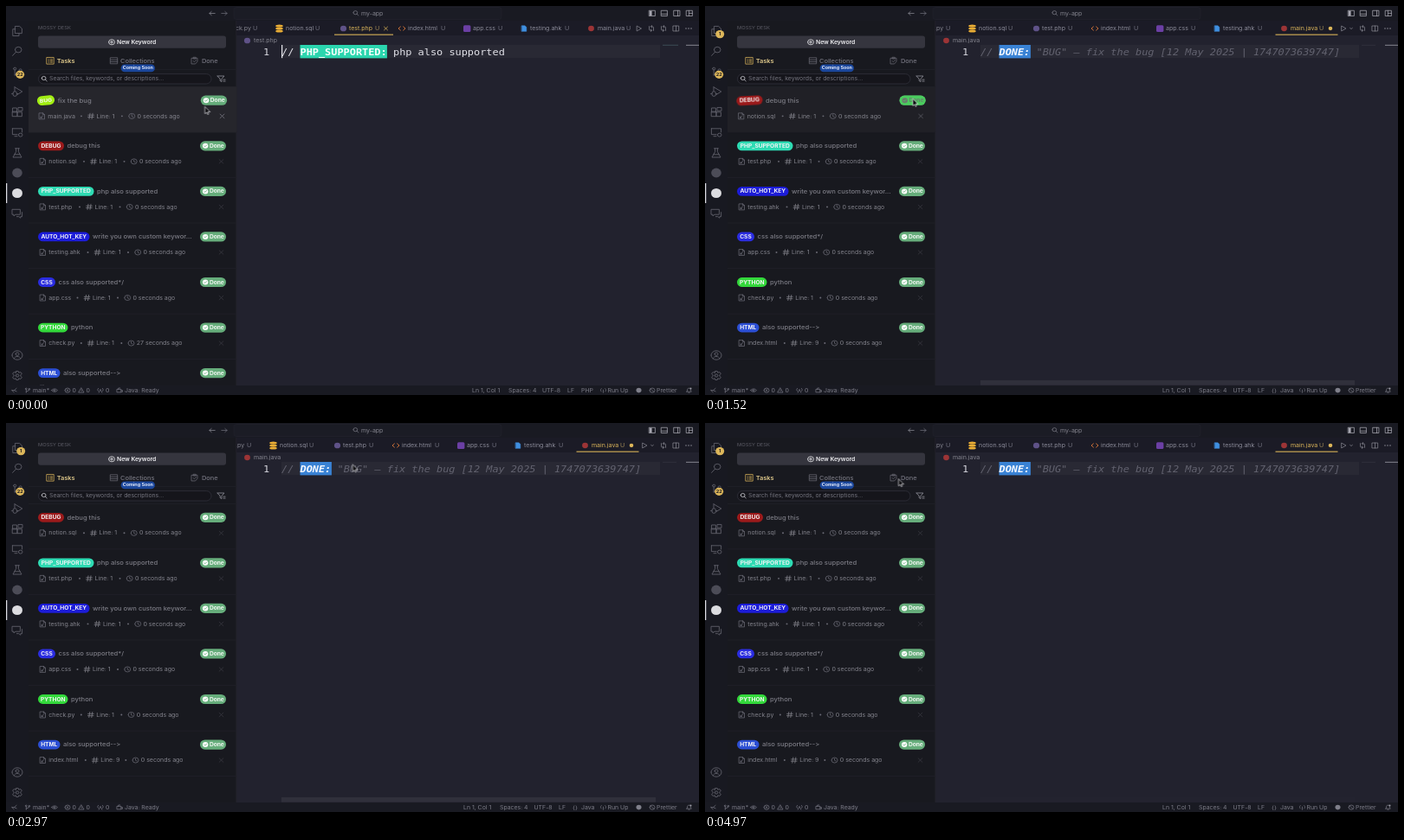
An HTML page that plays this animation: 800x450 px, repeating every 5000 ms.

```html
<!DOCTYPE html>
<html lang="en">
<head>
<meta charset="utf-8">
<title>Task list</title>
<style>
html, body { margin: 0; width: 100%; height: 100%; overflow: hidden; background: #22222e; }
svg { display: block; width: 100%; height: 100%; font-family: Inter, Roboto, sans-serif; }
text { white-space: pre; font-feature-settings: "calt" 0, "liga" 0; }
.code { font: 11.9px "DejaVu Sans Mono", "Liberation Mono", monospace; }
.bold { font-weight: 700; }
.slant { font-style: italic; }
.before, .after, .full, .bare, .loaded, .caret { animation: 5s step-end infinite; }
.before { animation-name: before; }
.after { animation-name: after; }
.full { animation-name: full; }
.bare { animation-name: bare; }
.loaded { animation-name: loaded; }
.caret { animation-name: caret; }
@keyframes before { 0% { opacity: 1 } 16%, 100% { opacity: 0 } }
@keyframes after { 0% { opacity: 0 } 16%, 100% { opacity: 1 } }
@keyframes full { 0% { opacity: 1 } 18%, 100% { opacity: 0 } }
@keyframes bare { 0% { opacity: 0 } 18% { opacity: 1 } 26%, 100% { opacity: 0 } }
@keyframes loaded { 0% { opacity: 0 } 26%, 100% { opacity: 1 } }
@keyframes caret { 0% { opacity: 1 } 10%, 100% { opacity: 0 } }

.row { transform-origin: 145px 120px; }
.tag { transform-box: fill-box; transform-origin: center; }
.full .hover { transform: scale(1.01); }
.full .hover .tag { transform: rotate(-5deg); }
.full .lit { animation: press 5s infinite; }
.loaded .hover { animation: grow 5s infinite; }
.loaded .hover .tag { animation: tilt 5s infinite; }
.loaded .glow, .loaded .lit { animation: glow 5s infinite; }
@keyframes press { 0%, 3% { opacity: 0 } 6%, 100% { opacity: 1 } }
@keyframes grow { 0%, 29%, 43%, 100% { transform: none } 33%, 39% { transform: scale(1.01) } }
@keyframes tilt { 0%, 29%, 43%, 100% { transform: none } 33%, 39% { transform: rotate(-5deg) } }
@keyframes glow { 0%, 29%, 43%, 100% { opacity: 0 } 33%, 39% { opacity: 1 } }

.bar { animation: bar 5s linear infinite; }
@keyframes bar { 0%, 85% { opacity: 1 } 99%, 100% { opacity: .15 } }
.pointer { animation: point 5s ease-in-out infinite; }
@keyframes point {
  0%, .6% { transform: translate(229.6px, 116.8px) }
  8%, 30% { transform: translate(239.8px, 107.6px) }
  34%, 38% { transform: translate(240.6px, 107px) }
  46%, 78.8% { transform: translate(400.2px, 48.3px) }
  89% { transform: translate(225px, 65.5px) }
  90.4%, 100% { transform: translate(223.4px, 65px) }
}
</style>
</head>
<body>
<svg viewBox="0 0 800 450" preserveAspectRatio="none"></svg>
<script>
const GOLD = '#dcb65a', GRAY = '#6a6a75', DIM = '#85858f';
// the screen is a taller one, flattened evenly
const FLAT = .87;

const rect = (x, y, w, h, fill, r = 0, more = '') =>
  `<rect x="${x}" y="${y}" width="${w}" height="${h}" rx="${r}" fill="${fill}" ${more}/>`;
const dot = (x, y, r, fill) => `<ellipse cx="${x}" cy="${y}" rx="${r}" ry="${r * .93}" fill="${fill}"/>`;
const place = (x, y) => `transform="translate(${x} ${y}) scale(1 ${FLAT})"`;
const icon = (x, y, d, color = GRAY, width = .8, fill = 'none') =>
  `<path ${place(x, y)} d="${d}" fill="${fill}" stroke="${color}" stroke-width="${width}" stroke-linecap="round" stroke-linejoin="round"/>`;
// y is the middle of the line
const label = (x, y, str, fill = DIM, size = 7, weight = 400, anchor = 'start') =>
  `<text ${place(x, y + size * .36 * FLAT)} fill="${fill}" font-size="${size}" font-weight="${weight}" text-anchor="${anchor}">${str}</text>`;
const code = (x, str, fill, style = '') =>
  `<text class="code ${style}" ${place(x, 56.5)} fill="${fill}">${str}</text>`;
const group = (name, ...parts) => `<g class="${name}">${parts.join('')}</g>`;
const ring = r => `M${-r} 0a${r} ${r} 0 1 0 ${2 * r} 0a${r} ${r} 0 1 0 ${-2 * r} 0`;

const shape = {
  cross: 'M-2.4-2.6L2.4 2.6M2.4-2.6L-2.4 2.6',
  check: 'M-1.4 .1L-.4 1.1L1.5-1.1',
  file: 'M-3-4H1L3-2V4H-3ZM1-4V-2H3M-1.4 2.2L1.2-.5M-1.4 2.2V.8M-1.4 2.2H0',
  hash: 'M-1-3.6L-2 3.6M2-3.6L1 3.6M-3.2-1.3H3.4M-3.4 1.3H3.2',
  clock: ring(3.5) + 'M0-2V.2L1.5 1',
  lens: 'M-2.6-.8a2.4 2.4 0 1 0 4.8 0a2.4 2.4 0 1 0-4.8 0M1.6 1L3.4 3',
  list: 'M-4-4.4H4V4.4H-4ZM-2-1.8H-1.6M0-1.8H2.3M-2 .2H-1.6M0 .2H2.3M-2 2.2H-1.6M0 2.2H2.3',
  code: 'M-1.6-2.4L-4 0L-1.6 2.4M1.6-2.4L4 0L1.6 2.4',
  split: 'M-3.2-3.4H3.2V3.4H-3.2ZM0-3.4V3.4',
  gitArrows: 'M-2.5-2.8V1a1.6 1.6 0 0 0 1.6 1.6H.5M-.7 1.2L.6 2.6L-.7 4M2.5 2.8V-1a1.6 1.6 0 0 0-1.6-1.6H-.5M.7-4L-.6-2.6L.7-1.2'
};

// tag, colour, tag width, title, file, file name end, line, age when first shown
const tasks = [
  ['BUG', '#a2ee13', 20, 'fix the bug', 'main.java', 80.5, 1, 0],
  ['DEBUG', '#9b1a1b', 30, 'debug this', 'notion.sql', 83, 1, 0],
  ['PHP_SUPPORTED', '#2edbb3', 64.5, 'php also supported', 'test.php', 78, 1, 0],
  ['AUTO_HOT_KEY', '#1c1cd8', 59.5, 'write you own custom keyword a...', 'testing.ahk', 87.5, 1, 0],
  ['CSS', '#2a2ce0', 20, 'css also supported*/', 'app.css', 75.5, 1, 0],
  ['PYTHON', '#33d83b', 34.5, 'python', 'check.py', 79.8, 1, 27],
  ['HTML', '#2c4fd4', 25.5, 'also supported--&gt;', 'index.html', 84.8, 9, 0]
];

function doneButton(y, icons, lit) {
  const bg = lit ? '#3be04c' : '#66ad7b', ink = lit ? '#10351a' : '#f2f7f3';
  const left = icons ? 224 : 231;
  return rect(left, y - 5.6, 254 - left, 11.2, bg, 5.6)
    + (icons ? dot(230.2, y, 3.2, lit ? '#102416' : '#fff') + icon(230.2, y, shape.check, bg, .9) : '')
    + label(243.3, y, 'Done', ink, 6.6, 700, 'middle');
}

function row(task, i, icons, hover, fresh) {
  const [tag, color, width, title, file, end, line, age] = task;
  const pitch = icons ? 52.55 : 48.75;
  const y = 109.3 + i * pitch, m = y + (icons ? 18 : 16);
  const e = icons ? end : end - 8.4;
  const at = icons ? [7, 24.5, 53.5, 71] : [8, 17, 46, 56];
  const text = icons ? title.replace('keyword a', 'keywor') : title;
  const meta = '#85858e';
  return group(hover ? 'row hover' : 'row',
    hover ? group('glow', rect(26, 93.6, 239, 52.4, '#26262c')) : '',
    rect(26, 93 + (i + 1) * pitch, 239, .7, '#22222a'),
    group('tag', rect(37, y - 5.4, width, 10.8, color, 5.4),
      label(37 + width / 2, y, tag, '#f4f4f6', 6.6, 700, 'middle')),
    label(40.5 + width, y, text, '#7d7d86', 7.6, 500),
    doneButton(y, icons, false),
    label(icons ? 49.3 : 41, m, file, meta),
    dot(e + at[0], m, 1, GRAY),
    label(e + at[1], m, 'Line: ' + line, meta),
    dot(e + at[2], m, 1, GRAY),
    label(e + at[3], m, (fresh ? 0 : age) + ' seconds ago', meta),
    icons ? icon(42.5, m, shape.file) + icon(e + 18, m, shape.hash, meta)
      + icon(e + 64.7, m, shape.clock) + icon(248.5, m, shape.cross, '#3a3a43') : '',
    hover ? group('glow', icon(248.5, m, shape.cross, '#74747d')) + group('lit', doneButton(y, true, true)) : '');
}
const list = (name, from, icons) =>
  group(name, ...tasks.slice(from).map((t, i) => row(t, i, icons, icons && i === 0, from > 0)));

const database = x => [-3, 0, 3].map(d =>
  `<ellipse cx="${x}" cy="${26 + d}" rx="4.3" ry="1.6" fill="#e9ad35"/>`).join('');
const page = x => icon(x, 26, 'M-2.6-3.6H1L2.8-1.8V3.8H-2.6Z', '#3f8fe0', .6, '#3f8fe0');

function tabs(shift, active) {
  const tab = (x, u, name) => {
    const c = name === active ? GOLD : '#8d8d9b';
    return label(x + shift, 26, name, c) + label(u + shift, 26, 'U', name === active ? '#a08a58' : '#737380');
  };
  return database(315.5 + shift) + tab(323, 357, 'notion.sql')
    + dot(389.5 + shift, 26, 3.6, '#5f5288') + tab(396, 426, 'test.php')
    + icon(457 + shift, 26, shape.code, '#d8773a', 1) + tab(464, 502, 'index.html')
    + rect(528 + shift, 22.3, 8.4, 7.6, '#6b3fa4', 1.5) + tab(539, 568, 'app.css')
    + page(598 + shift) + tab(605, 645, 'testing.ahk')
    + dot(675.5 + shift, 26, 3.4, '#9c3436') + tab(683, 716, 'main.java');
}

const status = (x, str) => label(x, 444.6, str, '#7f7f8a', 6.9);

function chrome() {
  const lay = 'M-3.4-3.6H3.4V3.6H-3.4Z', ink = '#a8a8b2';
  return rect(0, 0, 800, 17, '#191a22') + rect(266, 17, 534, 17, '#1b1b26')
    + rect(263, 1.5, 309, 14, '#1b1c25', 3, 'stroke="#23232d" stroke-width=".7"')
    + icon(403.5, 8.4, shape.lens, DIM, .7) + label(410, 8.6, 'my-app')
    + icon(238, 8.5, 'M3.2 0H-3.2M-.8-2.4L-3.2 0L-.8 2.4', DIM)
    + icon(252, 8.5, 'M-3.2 0H3.2M.8-2.4L3.2 0L.8 2.4', GRAY)
    + icon(746, 8.4, lay, ink) + rect(743, 5.6, 2.6, 5.6, ink)
    + icon(760, 8.4, lay + 'M-3.4 1H3.4', ink)
    + icon(774.5, 8.4, lay + 'M1-3.6V3.6', ink)
    + icon(789, 8.4, lay + 'M-.6-3.6V3.6M-.6 0H3.4', ink)
    + icon(759, 26, shape.gitArrows, DIM) + icon(773.5, 26, shape.split, DIM)
    + [785, 788, 791].map(x => dot(x, 26, .8, DIM)).join('');
}

function editor() {
  const mark = rect(785, 44.8, 15, 1.2, '#74747f') + rect(318, 45, 437, 15.2, '#292934');
  const ln = code(297, '1', '#d5d5dd');
  return group('before', tabs(0, 'test.php'), label(265, 26, 'ck.py'), label(285, 26, 'U', '#737380'),
      rect(379, 32.6, 68, 1.1, GOLD), icon(438.5, 26, 'M-2-2.2L2 2.2M2-2.2L-2 2.2', GOLD),
      icon(730.5, 26, 'M-2-3.2L3 0L-2 3.2Z', DIM), icon(745, 26, shape.gitArrows, DIM),
      dot(278.5, 40, 3.6, '#5f5288'), label(286, 40, 'test.php'),
      mark, ln, rect(758, 44.8, 18, 1, '#3c4c55'), rect(339.5, 45, 100.4, 15.4, '#2bd5ae'),
      code(318, '//', '#e3e3ea'), code(339.5, 'PHP_SUPPORTED:', '#f5fffc', 'bold'), code(447, 'php also supported', '#e3e3ea'))
    + group('caret', rect(318, 45, 1.2, 15.2, '#e8e8ee'))
    + group('after', tabs(-7, 'main.java'), label(265, 26, '.py'), label(278, 26, 'U', '#737380'),
      rect(658.5, 32.6, 72, 1.1, GOLD), dot(722, 26, 2.3, GOLD),
      icon(737, 26, 'M-2-3.2L3 0L-2 3.2Z', DIM), icon(746, 26, 'M-1.4-.7L0 .7L1.4-.7', DIM),
      dot(278.5, 40, 3.4, '#9c3436'), label(286, 40, 'main.java'),
      mark, ln, rect(758, 44.8, 16, 1, '#31313c'), rect(339.5, 45, 36.4, 15.4, '#3982d4'),
      code(318, '//', '#62626f', 'slant'), code(339.5, 'DONE:', '#f6f9ff', 'bold slant'),
      code(382.5, '"BUG" – fix the bug [12 May 2025 | 1747073639747]', '#62626f', 'slant'),
      group('bar', rect(318, 433, 432, 5.6, '#30303b')));
}

function sidebar() {
  const tab = (x, name, c, w) => label(x, 63.2, name, c, 7.4, w);
  return rect(26, 17, 240, 422, '#18191f') + rect(265.4, 17, .8, 422, '#23232c')
    + label(37, 25.5, 'MOSSY DESK', '#5c5c66', 5.8)
    + rect(37, 34.6, 217, 14.2, '#35353e', 3)
    + icon(122, 41.8, ring(3.5) + 'M-1.8 0H1.8M0-1.8V1.8', '#f0f0f3') + label(128, 41.8, 'New Keyword', '#f0f0f3', 6.8, 600)
    + icon(51.2, 63.3, shape.list, GOLD) + tab(58.7, 'Tasks', '#e2cb8c', 600)
    + rect(26, 73, 239, .7, '#22222a')
    + icon(124.7, 63.3, 'M-4-4H4V4H-4ZM-4-1.2H4M-4 1.4H4', GRAY) + tab(132, 'Collections', '#767680', 500)
    + icon(218, 63.3, 'M-3.6-3.4H3V1L.6 4.2H-3.6ZM-1.5-4.6H1.2V-2.6H-1.5ZM-1.8 .4L-.6 1.5L1.5-.8', GRAY) + tab(226, 'Done', '#767680', 500)
    + rect(132.6, 67.4, 39.4, 8.8, '#1b479c', 4.4) + label(152.3, 71.8, 'Coming Soon', '#e8eefc', 5.4, 700, 'middle')
    + rect(37.4, 78.6, 199.6, 11.4, '#15151b', 5.7, 'stroke="#32323b" stroke-width=".8"')
    + icon(43.8, 84.2, shape.lens, '#c4c4ca', .9) + label(50, 84.3, 'Search files, keywords, or descriptions...', '#767680', 6.9)
    + icon(248.5, 84.3, 'M-4.4-3.8H3.4L.4 .2V3.8L-1.4 2.4V.2ZM2.4 1H4.6M2.4 3.2H4.6', '#9a9aa3')
    + rect(26, 93, 239, .7, '#22222a')
    + list('full', 0, true) + list('bare', 1, false) + list('loaded', 1, true);
}

function activity() {
  const badge = (x, y, n) => dot(x, y, 5, GOLD) + label(x, y, n, '#1a1a20', 5.6, 700, 'middle');
  const at = (y, d) => icon(13, y, d, '#60606b', .95);
  return rect(0, 17, 26, 422, '#181921')
    + at(29, 'M-2.2-6.4H2.6L5.4-3.4V3H-2.2ZM-2.2-2.6H-5.2V6.4H2V3')
    + at(52, 'M-2.6-1.6a3.8 3.8 0 1 0 7.6 0a3.8 3.8 0 1 0-7.6 0M-1.5 1.5L-5.4 6.2')
    + at(76, 'M-4.4-4a1.6 1.6 0 1 0 3.2 0a1.6 1.6 0 1 0-3.2 0M2-2a1.6 1.6 0 1 0 3.2 0a1.6 1.6 0 1 0-3.2 0M-2.8-2.2V5M3.6-.2C3.4 2-2.8 1-2.8 4')
    + at(99, 'M-3-6L5.8 0L0 4M-3-6V-.6M-5 2a2.2 2.2 0 1 1 4.4 0V4a2.2 2.2 0 1 1-4.4 0ZM-6.4 3H-5M-.6 3H.8')
    + at(123, 'M-5.4-1H0V5.4H-5.4ZM0-1V5.4H5.4V-.2H-5.4M-5.4-1V-5.8H-.6V-1M1.4-6.4H6V-2H1.4Z')
    + at(146, 'M-5.6-4.8H5.6V0M-5.6-4.8V3H0M-3 5.4H0M1.4 3.6a2.3 2.3 0 1 0 4.6 0a2.3 2.3 0 1 0-4.6 0')
    + at(170, 'M-2.4-6H2.4M-1.4-6V-1.6L-5 5.8H5L1.4-1.6V-6M-3.2 2H3.2')
    + dot(13, 193, 5.8, '#4c4c57')
    + rect(0, 205, 1.3, 23, '#d8d8de') + dot(13, 216.5, 6, '#dcdce0')
    + at(240, 'M-5.6-5.4H3.4V1.4H-2L-4 3.4V1.4H-5.6ZM5.6-1.6V4.2H3.8V6L1.8 4.2H-.6')
    + at(404, ring(6) + 'M-2-1.6a2 2 0 1 0 4 0a2 2 0 1 0-4 0M-3.8 4.4C-3 .6 3 .6 3.8 4.4')
    + at(427.5, ring(1.8) + 'M-1.2-5.8H1.2L1.8-3.8L3.8-4.6L5.4-2.4L3.8-.8V.8L5.4 2.4L3.8 4.6L1.8 3.8L1.2 5.8H-1.2L-1.8 3.8L-3.8 4.6L-5.4 2.4L-3.8 .8V-.8L-5.4-2.4L-3.8-4.6L-1.8-3.8Z')
    + badge(16.2, 79.3, '22') + group('after', badge(17.2, 32.6, '1'));
}

function statusBar() {
  const at = (x, d) => icon(x, 444.6, d, '#7f7f8a', .7);
  return rect(0, 439, 800, 11, '#191a22')
    + at(9.5, 'M-2.6 0L-.4 2.4M-2.6 0H-.2M2.6-2.6L0 0L2.6 1.4')
    + at(25, 'M-2.6-2a.9.9 0 1 0 1.8 0a.9.9 0 1 0-1.8 0M1-1.6a.9.9 0 1 0 1.8 0a.9.9 0 1 0-1.8 0M-1.7-1V3M1.9-.6C1.6 1.4-1.7 .4-1.7 2') + status(31, 'main*')
    + at(56, 'M-3.4 0C-2-2.6 2-2.6 3.4 0C2 2.6-2 2.6-3.4 0M-1 0a1 1 0 1 0 2 0a1 1 0 1 0-2 0')
    + at(71, ring(3) + 'M-1.1-1.1L1.1 1.1M1.1-1.1L-1.1 1.1') + status(76.5, '0')
    + at(87, 'M0-3L3 2.8H-3ZM0-.8V.8') + status(92.5, '0')
    + at(109, 'M-2.4-2.6C-3.6-1-3.6 0-2.4 1M2.4-2.6C3.6-1 3.6 0 2.4 1M0-1L-1.8 3M0-1L1.8 3') + status(115, '0')
    + at(131.3, 'M-3-1.4H1.6V2.6H-3ZM-1.6-1.4V-3H.4M1.6 0H3.2V2H1.6') + status(137, 'Java: Ready')
    + group('before', status(538, 'Ln 1, Col 1'), status(580, 'Spaces: 4'), status(619, 'UTF-8'), status(648, 'LF'), status(664, 'PHP'))
    + group('after', status(528, 'Ln 1, Col 1'), status(570, 'Spaces: 4'), status(609.5, 'UTF-8'), status(638, 'LF'), status(654, '{}'), status(664, 'Java'))
    + at(689.5, 'M-2.2-2.4C-3.4-1-3.4 .4-2.2 1.6M2.2-2.4C3.4-1 3.4 .4 2.2 1.6M0-.6V3') + status(694.5, 'Run Up')
    + dot(730.5, 444.6, 3, '#7f7f8a')
    + at(746, ring(3) + 'M-2-2L2 2') + status(751, 'Prettier')
    + at(788.5, 'M-2.8 1.8H2.8L2 .6V-1C2-3.4-2-3.4-2-1V.6ZM-.7 3H.7') + dot(790.4, 442.4, 1.1, '#9a9aa5');
}

document.querySelector('svg').innerHTML =
  rect(0, 0, 800, 450, '#22222e') + chrome() + editor() + sidebar() + activity() + statusBar()
  + group('pointer', icon(0, 0, 'M0 0V9L1.9 7.1L3.1 10L4.4 9.4L3.2 6.6H5.7Z', '#ececf0', .7, '#0c0c0f'));
</script>
</body>
</html>
```
